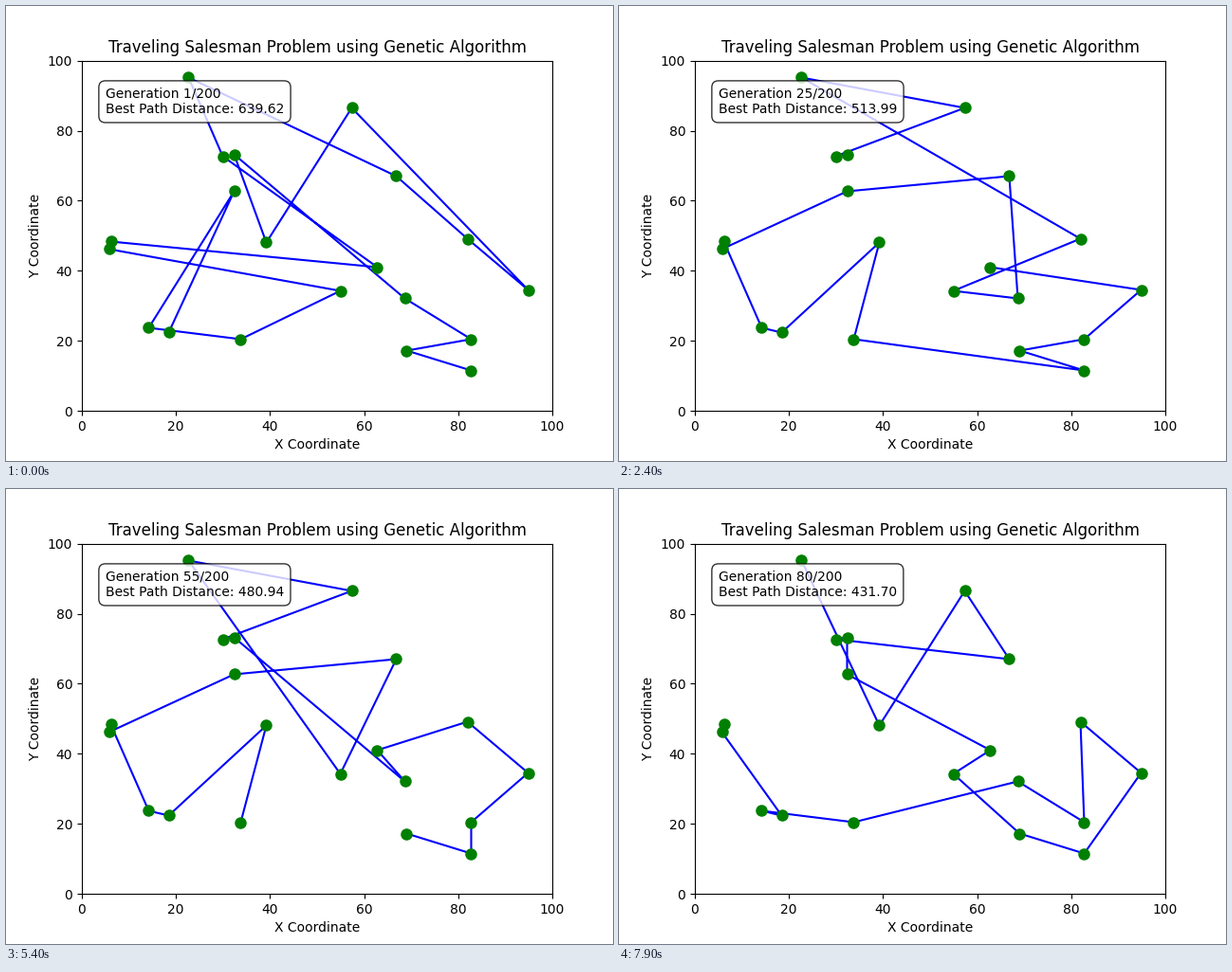
Animation of 640x480 px, one loop 8 s. Source, as a matplotlib script:

```python
import numpy as np
import matplotlib.pyplot as plt
from matplotlib.animation import FuncAnimation

FRAMES, INTERVAL, GENERATIONS = 80, 100, 200

CITIES = dict(
    A=(22.68, 95.16), B=(29.94, 72.70), C=(32.36, 73.24), D=(32.36, 62.69),
    E=(39.21, 48.08), F=(57.36, 86.50), G=(66.83, 67.02), H=(81.96, 49.16),
    I=(94.86, 34.55), J=(62.80, 41.04), K=(68.65, 32.12), L=(54.94, 34.28),
    M=(82.76, 20.48), N=(69.05, 17.23), O=(82.76, 11.55), P=(6.15, 48.35),
    Q=(5.75, 46.19), R=(14.21, 23.73), S=(18.45, 22.38), T=(33.77, 20.48),
)

# (first generation, visiting order, path length)
BEST = [
    (1, "ONMKCEFIHGABJPQLTRDS", 639.62),
    (6, "ONMKCEFIHGABDLJQSTRP", 555.11),
    (25, "CBFAHLKGDQPRSETONMIJ", 513.99),
    (40, "NOMIHJKCBFALGDQPRSET", 480.94),
    (60, "AEFGBCDJLNOIHMKTRSQP", 431.70),
]

fig, ax = plt.subplots(figsize=(6.4, 4.8), dpi=100)
ax.set(xlim=(0, 100), ylim=(0, 100),
       xlabel="X Coordinate", ylabel="Y Coordinate",
       title="Traveling Salesman Problem using Genetic Algorithm")

path, = ax.plot([], [], "b-", lw=1.5)
ax.plot(*np.array(list(CITIES.values())).T, "go", markersize=8)
info = ax.text(5, 85, "", fontsize=10,
               bbox=dict(boxstyle="round,pad=0.5", facecolor="white", alpha=0.8))


def update(i):
    gen = i + 1
    _, order, length = [b for b in BEST if b[0] <= gen][-1]
    path.set_data(*np.array([CITIES[c] for c in order]).T)
    info.set_text(f"Generation {gen}/{GENERATIONS}\n"
                  f"Best Path Distance: {length:.2f}")
    return path, info


anim = FuncAnimation(fig, update, frames=FRAMES, interval=INTERVAL, repeat=True)
plt.show()
```
